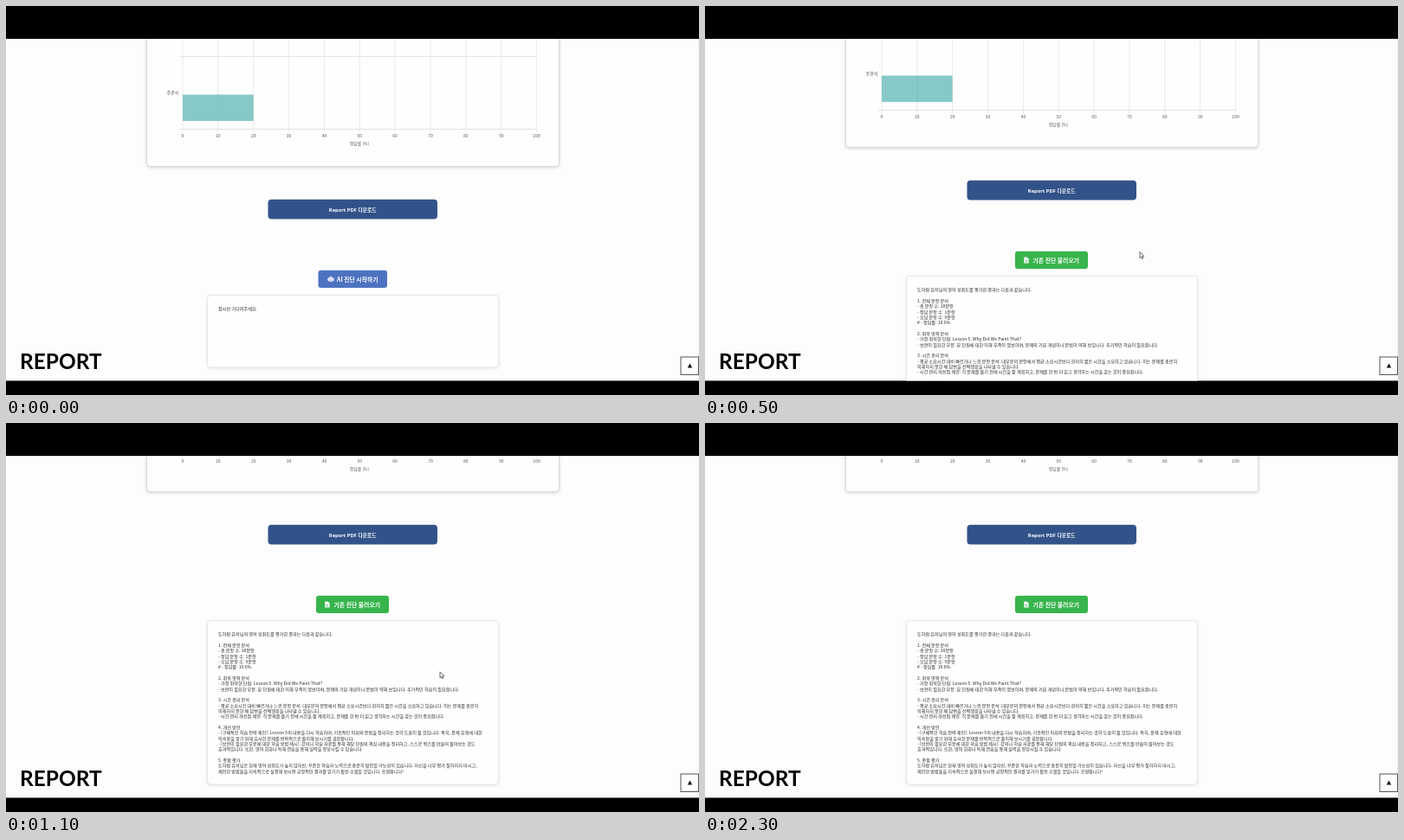
An HTML page with a canvas that plays this animation: 800 by 450 pixels, repeating every 2.4 s.

```html
<!DOCTYPE html>
<html lang="ko">
<head>
<meta charset="utf-8">
<title>Report</title>
<style>
html, body { margin: 0; width: 100%; height: 100%; overflow: hidden; background: #000; }
canvas { display: block; width: 800px; height: 450px; }
</style>
</head>
<body>
<canvas id="stage" width="800" height="450"></canvas>
<script>
const ctx = document.getElementById('stage').getContext('2d');
const LOOP = 2400, STEP = 100;
const KR = '"Noto Sans CJK KR", "Noto Sans CJK", "Noto Sans", sans-serif';
const MIX = '"Noto Sans", ' + KR;

const REPORT = [
  '도하람 유저님의 영어 성취도를 평가한 결과는 다음과 같습니다.',
  '',
  '1. 전체 문항 분석',
  '- 총 문항 수: 10문항',
  '- 정답 문항 수: 1문항',
  '- 오답 문항 수: 9문항',
  '# - 정답률: 10.0%',
  '',
  '2. 취약 영역 분석',
  '- 가장 취약한 단원: Lesson 5. Why Did We Paint That?',
  '- 보완이 필요한 부분: 본 단원에 대한 이해 부족이 엿보이며, 문제의 기본 개념이나 문법이 약해 보입니다. 추가적인 학습이 필요합니다.',
  '',
  '3. 시간 관리 분석',
  '- 평균 소요시간 대비 빠르거나 느린 문항 분석: 대부분의 문항에서 평균 소요시간보다 현저히 짧은 시간을 소요하고 있습니다. 이는 문제를 충분히',
  '이해하지 못한 채 답변을 선택했음을 나타낼 수 있습니다.',
  '- 시간 관리 개선점 제안: 각 문제를 풀기 전에 시간을 잘 계획하고, 문제를 한 번 더 읽고 생각하는 시간을 갖는 것이 중요합니다.',
  '',
  '4. 개선 방안',
  '- [구체적인 학습 전략 제안]: Lesson 5의 내용을 다시 학습하며, 기초적인 어휘와 문법을 정리하는 것이 도움이 될 것입니다. 특히, 문제 유형에 대한',
  '익숙함을 쌓기 위해 유사한 문제를 반복적으로 풀이해 보시기를 권장합니다.',
  '- [보완이 필요한 부분에 대한 학습 방법 제시]: 강의나 학습 자료를 통해 해당 단원의 핵심 내용을 정리하고, 스스로 퀴즈를 만들어 풀어보는 것도',
  '효과적입니다. 또한, 영어 회화나 독해 연습을 통해 실력을 향상시킬 수 있습니다.',
  '',
  '5. 종합 평가',
  '도하람 유저님은 현재 영어 성취도가 높지 않지만, 꾸준한 학습과 노력으로 충분히 발전할 가능성이 있습니다. 자신을 너무 평가 절하하지 마시고,',
  '제안한 방법들을 지속적으로 실행해 보시면 긍정적인 결과를 얻기가 훨씬 수월할 것입니다. 응원합니다!'
];

// [time, value...] keys, linear between
const SCROLL = [[300, 0], [400, 6], [500, 22], [600, 30.2], [700, 106]];
const POINTER = [
  [200, 517, 259], [300, 517, 259], [400, 507, 276], [500, 502, 284.5], [600, 501, 287],
  [700, 501, 287.5], [1300, 501, 288], [1500, 494, 295], [1600, 508, 280],
  [1700, 570, 205], [1800, 636, 120], [1900, 632, 87]
];

function at(keys, t) {
  if (t <= keys[0][0]) return keys[0].slice(1);
  for (let i = 1; i < keys.length; i++) {
    const a = keys[i - 1], b = keys[i];
    if (t <= b[0]) {
      const k = (t - a[0]) / (b[0] - a[0]);
      return a.slice(1).map((v, j) => v + (b[j + 1] - v) * k);
    }
  }
  return keys[keys.length - 1].slice(1);
}

function rect(x, y, w, h, color) {
  ctx.fillStyle = color;
  ctx.fillRect(x, y, w, h);
}

function round(x, y, w, h, r, fill, stroke) {
  ctx.beginPath();
  ctx.roundRect(x, y, w, h, r);
  ctx.fillStyle = fill;
  ctx.fill();
  if (stroke) {
    ctx.shadowColor = 'transparent';
    ctx.strokeStyle = stroke;
    ctx.lineWidth = 1;
    ctx.stroke();
  }
}

function poly(points, fill) {
  ctx.beginPath();
  points.forEach(([x, y]) => ctx.lineTo(x, y));
  ctx.closePath();
  ctx.fillStyle = fill;
  ctx.fill();
}

// Small type is laid out at ten times its size for exact spacing
function text(str, x, y, size, color, align = 'left', weight = 400, family = KR) {
  ctx.save();
  ctx.translate(x, y);
  ctx.scale(0.1, 0.1);
  ctx.font = `${weight} ${size * 10}px ${family}`;
  ctx.textAlign = align;
  ctx.fillStyle = color;
  ctx.fillText(str, 0, 0);
  ctx.restore();
}

function card(x, y, w, h, border, shadow) {
  ctx.save();
  ctx.shadowColor = shadow;
  ctx.shadowBlur = 4;
  ctx.shadowOffsetY = 1;
  round(x, y, w, h, 4, '#fefefe', border);
  ctx.restore();
}

function chart() {
  card(162.5, -60.5, 476, 246, '#d9d9db', 'rgba(0,0,0,.2)');
  const left = 204, gap = 40.85;
  for (let i = 0; i <= 10; i++) {
    const x = left + i * gap;
    rect(x - 0.5, -40, 1, 186.5, '#e9e9e9');
    text(String(i * 10), x, 152, 5, '#5c5c5c', 'center');
  }
  rect(200, 58, 412.5, 1, '#e6e6e6');
  rect(200, 142, 412.5, 1, '#e2e2e2');
  rect(left, 102.5, 81.7, 30.5, '#87c9c7');
  rect(left + gap - 0.5, 102.5, 1, 30.5, '#7fc2c0');
  text('주관식', 199.5, 102, 5.1, '#5c5c5c', 'right');
  text('정답률 (%)', 408, 161, 4.9, '#5c5c5c', 'center');
}

function robot(x, y) {
  rect(x + 3.5, y, 0.9, 2, '#fff');
  round(x + 1.2, y + 1.4, 5.5, 5, 1.2, '#fff');
  rect(x, y + 3, 0.8, 2.3, '#fff');
  rect(x + 7.1, y + 3, 0.8, 2.3, '#fff');
  rect(x + 2.5, y + 3, 1, 1, '#4d72c0');
  rect(x + 4.5, y + 3, 1, 1, '#4d72c0');
  rect(x + 2.5, y + 5, 3, 0.5, '#4d72c0');
}

function file(x, y) {
  poly([[x, y], [x + 3.3, y], [x + 5.3, y + 2], [x + 5.3, y + 7], [x, y + 7]], '#fff');
  rect(x + 1.3, y + 3.3, 2.7, 0.7, '#37b44c');
  rect(x + 1.3, y + 5, 2.7, 0.7, '#37b44c');
}

function result(done) {
  if (done) {
    round(358, 305.7, 84, 20.3, 3, '#37b44c');
    file(368.3, 312.6);
    text('기존 진단 불러오기', 378.5, 318.5, 6.85, '#fff', 'left', 700);
  } else {
    round(360.5, 305.7, 79.5, 20.3, 3, '#4d72c0');
    robot(371, 312.3);
    text('AI 진단 시작하기', 382, 318.5, 6.85, '#fff', 'left', 700);
  }
  card(232.5, 334.5, 336, done ? 189.5 : 83.5, '#e7e7e9', 'rgba(0,0,0,.12)');
  const lines = done ? REPORT : ['잠시만 기다려주세요.'];
  lines.forEach((s, i) => text(s, 245, 352.3 + i * 6.34, 5.13, '#2c2c2c'));
}

function pointer(x, y) {
  ctx.beginPath();
  [[0, 0], [0, 7], [1.6, 5.6], [2.7, 8], [3.7, 7.5], [2.7, 5.2], [4.8, 5]]
    .forEach(([dx, dy]) => ctx.lineTo(x + dx, y + dy));
  ctx.closePath();
  ctx.fillStyle = '#fff';
  ctx.fill();
  ctx.strokeStyle = '#444';
  ctx.lineWidth = 0.8;
  ctx.stroke();
}

function overlay() {
  text('REPORT', 16, 420, 24.5, '#000', 'left', 700, 'Lato, Inter, sans-serif');
  rect(799, 38, 1, 395.5, '#eff7e8');
  rect(778.5, 405.5, 21.5, 21.5, '#555');
  rect(779.5, 406.5, 19.5, 19.5, '#fefefe');
  poly([[789.5, 413.6], [792.2, 418.6], [786.8, 418.6]], '#111');
}

function draw(t) {
  rect(0, 0, 800, 450, '#000');
  ctx.save();
  ctx.beginPath();
  ctx.rect(0, 38, 800, 395.5);
  ctx.clip();
  rect(0, 38, 800, 396, '#fdfdfd');
  ctx.save();
  ctx.translate(0, -at(SCROLL, t)[0]);
  chart();
  round(302.5, 223.8, 195.5, 22.7, 4, '#32538a');
  text('Report PDF 다운로드', 400.2, 237.9, 5.75, '#fff', 'center', 700, MIX);
  result(t >= 200);
  ctx.restore();
  overlay();
  if (t >= 200 && t < 2000) pointer(...at(POINTER, t));
  ctx.restore();
}

const start = performance.now();
function tick() {
  const t = (performance.now() - start) % LOOP;
  draw(Math.floor(t / STEP) * STEP);
  requestAnimationFrame(tick);
}
tick();
</script>
</body>
</html>
```
